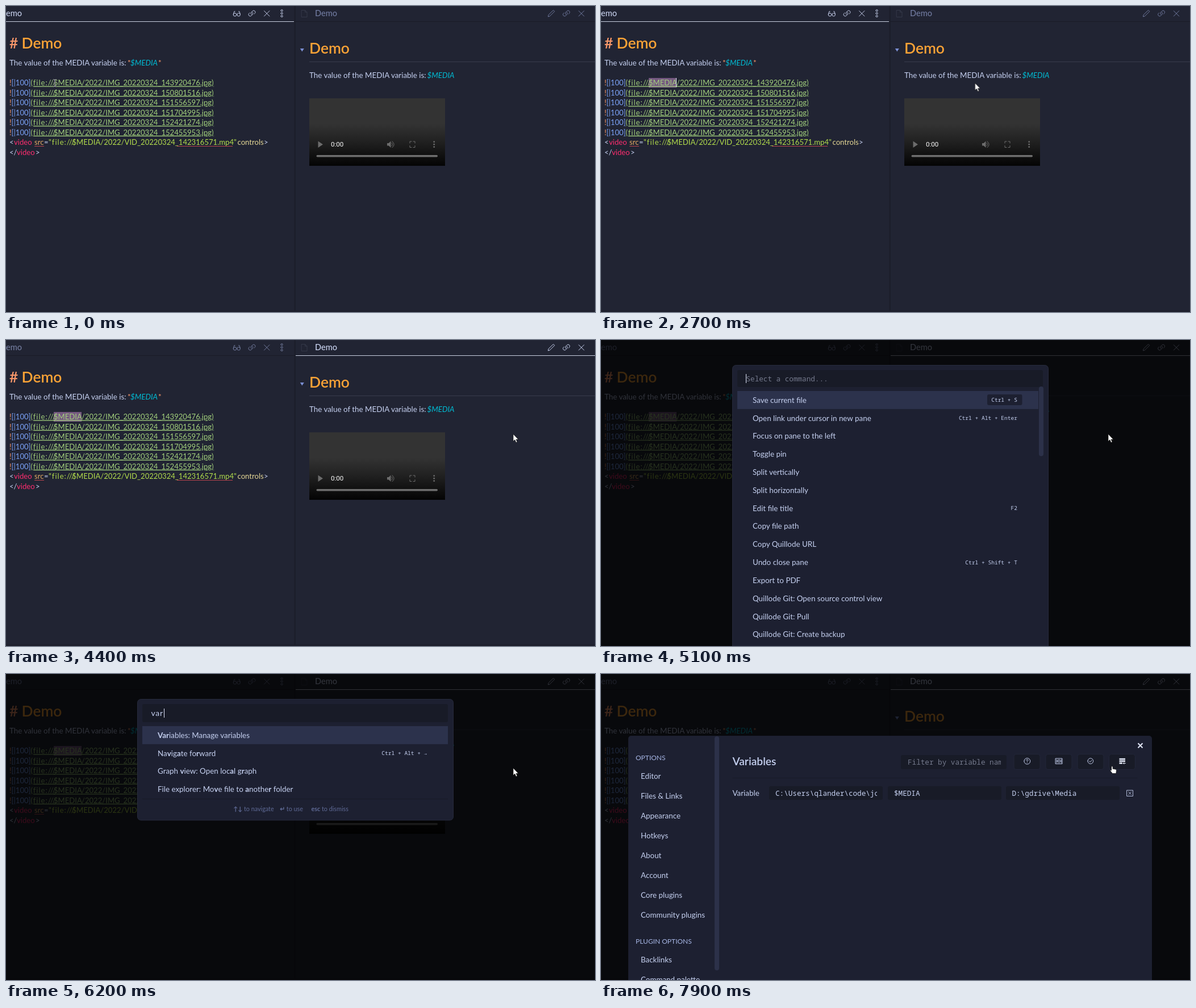
Recreate the animation shown at these times as an HTML page. Size 1037 by 540 pixels, loop 8000 ms.

```html
<!DOCTYPE html>
<html lang="en">
<head>
<meta charset="utf-8">
<title>Variables demo</title>
<style>
html, body { margin: 0; width: 100%; height: 100%; overflow: hidden; background: #212433; }
svg { display: block; }
#stage { width: 1037px; height: 540px; }
text { font: 13.4px Lato, "Open Sans", sans-serif; fill: #c5d0f0; white-space: pre; }
.code { font-size: 13.1px; }
.slashes { letter-spacing: 1px; }
.head { font-size: 14.6px; font-weight: 500; fill: currentColor; }
.h1 { font-size: 26.4px; font-weight: 600; fill: #fca336; }
.mono { font: 12.65px "Noto Sans Mono", "DejaVu Sans Mono", monospace; }
.key { font: 9.55px "Noto Sans Mono", "DejaVu Sans Mono", monospace; text-anchor: end; }
.dim { fill: #74798c; }
.small { font-size: 12px; fill: #a6b5e4; }
.foot { font-size: 10.8px; fill: #5f6a96; }
.typed { font-size: 14px; letter-spacing: .7px; }
.title { font-size: 19.2px; font-weight: 600; }
.time { font: 11.6px Roboto, sans-serif; fill: #fff; }
.salmon { fill: #f7976a; }
.blue { fill: #7aa2f7; }
.link { fill: #a2d07c; text-decoration: underline; text-decoration-skip-ink: none; }
.cyan { fill: #00bcd4; font-style: italic; }
.pink { fill: #ff2d6f; }
.gold { fill: #e2a862; }
.lime { fill: #b2dc4c; }
.sand { fill: #e5d795; }
.b { font-weight: 700; }
.icon { fill: none; stroke: currentColor; stroke-width: 1; stroke-linecap: round; stroke-linejoin: round; }

.a { animation: 8s -20ms step-end infinite; }
.left { animation-name: blur; }
.right { animation-name: focus; }
@keyframes blur { 0% { color: #c3cce8; } 55%, 100% { color: #737c9e; } }
@keyframes focus { 0% { color: #707a9f; } 55%, 100% { color: #c9d3f0; } }
.before { animation-name: before; }
.after { animation-name: after; }
@keyframes before { 0% { opacity: 1; } 55%, 100% { opacity: 0; } }
@keyframes after { 0% { opacity: 0; } 55%, 100% { opacity: 1; } }

.modal { animation-name: modal; }
.empty { animation-name: empty; }
.one { animation-name: one; }
.two { animation-name: two; }
.three { animation-name: three; }
.settings { animation-name: settings; }
.blink { animation-name: blink; }
@keyframes modal { 0% { opacity: 0; } 63.75%, 100% { opacity: 1; } }
@keyframes empty { 0% { opacity: 0; } 63.75% { opacity: 1; } 73.75%, 100% { opacity: 0; } }
@keyframes one { 0% { opacity: 0; } 73.75% { opacity: 1; } 75%, 100% { opacity: 0; } }
@keyframes two { 0% { opacity: 0; } 75% { opacity: 1; } 77.5%, 100% { opacity: 0; } }
@keyframes three { 0% { opacity: 0; } 77.5% { opacity: 1; } 83.75%, 100% { opacity: 0; } }
@keyframes settings { 0% { opacity: 0; } 83.75%, 100% { opacity: 1; } }
@keyframes blink { 0% { opacity: 1; } 71.25%, 100% { opacity: 0; } }

.sel { animation-name: drag; }
@keyframes drag {
  0% { width: 0; }
  5% { width: 0; animation-timing-function: steps(3); }
  8.75% { width: 213px; animation-timing-function: steps(6); }
  16.25% { width: 39px; }
  17.5%, 100% { width: 49px; }
}
.caret { animation-name: caret, pulse; }
@keyframes caret {
  0% { transform: translate(5px, 110px); }
  6.25% { transform: translate(155px, 127px); animation-timing-function: steps(2); }
  8.75% { transform: translate(297px, 127px); animation-timing-function: steps(6); }
  16.25% { transform: translate(123px, 127px); }
  17.5%, 100% { transform: translate(132px, 127px); }
}
@keyframes pulse {
  0% { opacity: 0; } 2.5% { opacity: 1; } 25% { opacity: 0; } 32.5% { opacity: 1; }
  40% { opacity: 0; } 47.5% { opacity: 1; } 55%, 100% { opacity: 0; }
}
.pointer { animation-name: move; }
@keyframes move {
  0% { transform: translate(86px, 136px); }
  5% { transform: translate(86px, 136px); animation-timing-function: steps(3); }
  8.75% { transform: translate(297px, 135.5px); animation-timing-function: steps(6); }
  16.25% { transform: translate(128px, 135.5px); }
  17.5% { transform: translate(132px, 135.5px); }
  21.25% { transform: translate(132px, 135.5px); animation-timing-function: steps(4); }
  26.25% { transform: translate(640px, 222px); }
  27.5% { transform: translate(744px, 232px); animation-timing-function: steps(2); }
  30% { transform: translate(650px, 125px); }
  31.25% { transform: translate(650px, 125px); animation-timing-function: steps(2); }
  33.75% { transform: translate(658.5px, 136px); animation-timing-function: steps(4); }
  38.75% { transform: translate(799px, 178px); animation-timing-function: steps(2); }
  41.25% { transform: translate(770px, 150px); }
  43.75% { transform: translate(770px, 150px); animation-timing-function: steps(3); }
  47.5% { transform: translate(943px, 63px); animation-timing-function: steps(3); }
  51.25% { transform: translate(893px, 166px); }
  96.25% { transform: translate(893px, 166px); animation-timing-function: steps(2); }
  98.75%, 100% { transform: translate(900px, 163px); }
}
.beam { animation-name: beam; }
.arrow { animation-name: arrow; }
.hand { animation-name: hand; }
@keyframes beam { 0% { opacity: 1; } 25%, 100% { opacity: 0; } }
@keyframes arrow { 0% { opacity: 0; } 25% { opacity: 1; } 97.5%, 100% { opacity: 0; } }
@keyframes hand { 0% { opacity: 0; } 97.5%, 100% { opacity: 1; } }
</style>
</head>
<body>
<svg id="stage" viewBox="0 0 1037 540"></svg>
<script>
const text = (x, y, s, c = '') => `<text x="${x}" y="${y}" class="${c}">${s}</text>`;
const rect = (x, y, w, h, fill, r = 0, more = '') =>
  `<rect x="${x}" y="${y}" width="${w}" height="${h}" fill="${fill}" rx="${r}" ${more}/>`;
const icon = (d, color = 'currentColor') => `<path class="icon" d="${d}" style="stroke:${color}"/>`;
const anim = (name, ...parts) => `<g class="a ${name}">${parts.join('')}</g>`;
const clip = (x, y, w, h, s, c) =>
  `<svg x="${x}" y="${y}" width="${w}" height="${h}" overflow="hidden">${text(0, 17, s, c)}</svg>`;
// *x* marks the matched letters
const bold = s => s.replace(/\*(.+?)\*/g, '<tspan class="b">$1</tspan>');

const cross = (x, y, r) => `M${x - r} ${y - r}l${2 * r} ${2 * r}m0 ${-2 * r}l${-2 * r} ${2 * r}`;
const chain = (x, y) => `M${x - 1} ${y + 2}a3 3 0 0 1 0-4l2.5-2.5a2.9 2.9 0 0 1 4 4l-1.5 1.5` +
  `M${x + 1} ${y - 2}a3 3 0 0 1 0 4l-2.5 2.5a2.9 2.9 0 0 1-4-4l1.5-1.5`;
const ring = (x, y, r) => `M${x - r} ${y}a${r} ${r} 0 1 0 ${2 * r} 0a${r} ${r} 0 1 0 ${-2 * r} 0`;

function headers() {
  return rect(0, 27, 508, 1, '#191b27') + rect(510, 27, 527, 1, '#191b27') +
    anim('before', rect(0, 27, 507, 1, '#c9cfdf')) +
    anim('after', rect(510, 27, 527, 1, '#c9cfdf')) +
    anim('left',
      text(0, 17.5, 'emo', 'head'),
      icon(ring(403, 15.3, 2.8) + ring(409.6, 15.3, 2.8) + 'M400.3 14.5l1.6-5h1.2M412.4 14.5l-1.6-5h-1.2'),
      icon(chain(433, 13)), icon(cross(459.2, 13.3, 4.7)),
      icon(ring(485.6, 8, 1.6) + ring(485.6, 13, 1.6) + ring(485.6, 18, 1.6))) +
    icon('M520.5 7.5h6l3.5 3.5v8.5h-9.5zM526.5 7.5v3.5h3.5', '#343849') +
    anim('right',
      text(544, 17.5, 'Demo', 'head'),
      icon('M954.5 18.5l.7-3 8.5-8.2 2.2 2.2-8.4 8.3z'),
      icon(chain(986.6, 13)), icon(cross(1013, 13.3, 4.7)));
}

const sentence = 'The value of the MEDIA variable is:';

function editor() {
  let out = `<rect class="a sel" x="84" y="127" height="17" fill="#755980"/>` +
    text(6, 75, '#', 'h1 salmon') + text(27.5, 75, 'Demo', 'h1') +
    text(6, 105, sentence) +
    text(214, 105, '*', 'salmon') + text(219, 105, '$MEDIA', 'cyan') + text(268, 105, '*', 'salmon');
  ['143920476', '150801516', '151556597', '151704995', '152421274', '152455953'].forEach((id, i) => {
    const y = 140.3 + i * 17.5;
    out += text(6, y, '!', 'code salmon') + text(9.5, y, '[|100]', 'code blue') +
      text(43.5, y, '(file:///', 'code link slashes') + text(84, y, '$MEDIA', 'code link') +
      text(133, y, `/2022/IMG_20220324_${id}.jpg)`, 'code link');
  });
  const y = 245.3;
  return out + text(6, y, '&lt;', 'code') + text(14, y, 'video', 'code pink') +
    text(50, y, 'src', 'code gold') + text(67, y, '=', 'code') +
    text(75, y, '"file:///', 'code lime slashes') +
    text(116.5, y, '$MEDIA/2022/VID_20220324_142316571.mp4"', 'code lime') +
    text(407.5, y, 'controls', 'code sand') + text(454, y, '&gt;', 'code') +
    rect(50, 247, 17, 1, '#b8434f') + rect(301, 247, 98, 1, '#b8434f') +
    text(6, 262.8, '&lt;/', 'code') + text(19, 262.8, 'video', 'code pink') + text(52, 262.8, '&gt;', 'code') +
    `<rect class="a caret" width="1" height="16" fill="#e4e9f8"/>`;
}

function preview() {
  const gray = '#6c6c6c';
  return `<path d="M517.8 75h7l-3.5 5.5z" fill="#7b8fd4"/>` +
    text(534, 84, 'Demo', 'h1') + rect(534, 98, 503, 1, '#383c4d') +
    text(534, 126.6, sentence) + text(741.5, 126.6, '$MEDIA', 'cyan') +
    rect(534, 163, 239, 119, 'url(#shade)') +
    `<path d="M549.5 238.5v11.5l8.5-5.75z" fill="${gray}"/>` +
    text(572, 248.2, '0:00', 'time') +
    `<path d="M671 242v4.5h2.8l3.7 3.5v-11.5l-3.7 3.5z" fill="${gray}"/>` +
    icon('M679.5 241.5q2 2.7 0 5.5M680 238.8q6.5 5.5 0 11', gray) +
    icon('M711 242v-3h3M717 239h3v3M720 246.5v3h-3M714 249.5h-3v-3', gray) +
    [239.7, 244.2, 248.7].map(y => `<circle cx="753.7" cy="${y}" r="1.4" fill="${gray}"/>`).join('') +
    rect(546.5, 263, 213.5, 3.6, '#6f6f6f', 1.8);
}

const MODAL = '#1d2031', FIELD = '#181b27', HIGHLIGHT = '#2c324c', THUMB = '#2c3149';

// rows: [label, hotkey]; bottom is the modal's lower edge
function palette(query, rows, bottom) {
  const scroll = bottom > 540, top = query ? 92 : 90, right = scroll ? 770 : 778;
  const edge = scroll ? 733 : 741.5;
  let out = rect(231.5, 44.5, 556, bottom - 44.5, MODAL, 6, 'stroke="#262a3c"') +
    rect(240, 53, 538, top - 60, FIELD, 3) +
    rect(240, top, right - 240, 31.8, HIGHLIGHT);
  out += query
    ? text(255.5, 74, query, 'typed') + rect([263, 271, 278][query.length - 1], 61, 1, 16, '#dfe5f8')
    : text(255.5, 73, 'Select a command...', 'mono dim') +
      `<rect class="a blink" x="255" y="60" width="1" height="16" fill="#dfe5f8"/>`;
  rows.forEach(([label, key], i) => {
    const y = top + 20.8 + i * 31.81;
    out += text(267, y, bold(label));
    if (key && !i) out += rect(680, y - 14.8, 61.5, 19, MODAL, 3);
    if (key) out += text(edge, y - 1.5, key, 'key');
  });
  if (scroll) return out + rect(771, top - 8, 8, query ? 250 : 123, THUMB, 4);
  const f = bottom - 16;
  return out + rect(240, bottom - 38, 538, 1, '#171a26') +
    text(400, f, '<tspan class="b">↑↓</tspan> to navigate', 'foot') +
    text(482, f, '<tspan class="b">↵</tspan> to use', 'foot') +
    text(537.5, f, '<tspan class="b">esc</tspan> to dismiss', 'foot');
}

const save = 'Ctrl + S', enter = 'Ctrl + Alt + Enter';
const commands = [
  ['Save current file', save], ['Open link under cursor in new pane', enter],
  ['Focus on pane to the left'], ['Toggle pin'], ['Split vertically'], ['Split horizontally'],
  ['Edit file title', 'F2'], ['Copy file path'], ['Copy Quillode URL'],
  ['Undo close pane', 'Ctrl + Shift + T'], ['Export to PDF'],
  ['Quillode Git: Open source control view'], ['Quillode Git: Pull'], ['Quillode Git: Create backup']
];
const forV = [
  ['*V*ariables: Manage variables'], ['Split *v*ertically'], ['Graph *v*iew: Open graph view'],
  ['Graph *v*iew: Open local graph'], ['Open another *v*ault'], ['Sa*v*e current file', save],
  ['Na*v*igate back', 'Ctrl + Alt + ←'], ['Na*v*igate forward', 'Ctrl + Alt + →'],
  ['Quillode Git: Open source control *v*iew'], ['Toggle pre*v*iew', 'Ctrl + E'],
  ['File explorer: Mo*v*e file to another folder'], ['File explorer: Re*v*eal file in navigation'],
  ['Mo*v*e line up'], ['Mo*v*e line down']
];
const forVa = [
  ['*Va*riables: Manage variables'], ['Open another *va*ult'], ['Na*v*ig*a*te back', 'Ctrl + Alt + ←'],
  ['Na*v*ig*a*te forward', 'Ctrl + Alt + →'], ['Split *v*ertic*a*lly'],
  ['Graph *v*iew: Open gr*a*ph view'], ['Graph *v*iew: Open loc*a*l graph'],
  ['Graph *v*iew: St*a*rt timelapse'], ['File explorer: Mo*v*e file to *a*nother folder'],
  ['File explorer: Re*v*eal file in n*a*vigation'], ['Remo*v*e he*a*ding']
];
const forVar = [
  ['*Var*iables: Manage variables'], ['Na*v*ig*a*te fo*r*ward', 'Ctrl + Alt + →'],
  ['Graph *v*iew: Open loc*a*l g*r*aph'], ['File explorer: Mo*v*e file to *a*nothe*r* folder']
];

function settings() {
  let out = rect(48, 109, 922, 440, MODAL, 5) + rect(200, 110, 8, 413, THUMB, 4) +
    text(61, 152, 'OPTIONS', 'small') + text(61, 476.4, 'PLUGIN OPTIONS', 'small');
  ['Editor', 'Files &amp; Links', 'Appearance', 'Hotkeys', 'About', 'Account', 'Core plugins', 'Community plugins']
    .forEach((s, i) => out += text(70, 184.8 + 35 * i, s));
  out += text(70, 509.2, 'Backlinks') + text(70, 544.2, 'Command palette') +
    text(231.5, 161, 'Variables', 'title') +
    `<path d="${cross(949.5, 126.3, 4)}" stroke="#e3e8f8" stroke-width="2" fill="none"/>` +
    rect(528, 143, 186, 25, FIELD, 3) + clip(540, 143, 164, 25, 'Filter by variable names', 'mono dim');
  [727, 783, 839, 894.5].forEach(x => out += rect(x, 141.5, 46, 27, FIELD, 4, 'stroke="#222639"'));
  const c = '#c3cdec', light = '#e3e8f8';
  out += icon(ring(750.3, 153.8, 5.4) + 'M748.7 152.5q0-1.8 1.6-1.8t1.6 1.5q0 1-1.6 2v.6M750.3 156.8v.1', c) +
    icon('M800.5 149h11.5v9.5h-11.5z' + ring(806.2, 153.7, 2.6) + ring(806.2, 153.7, .6) +
      'M802.2 151v5.5M810.3 151v5.5', c) +
    icon(ring(861.8, 153.6, 4.9) + 'M859.6 153.7l1.7 1.7 2.9-3.2', c) +
    rect(912.5, 148.8, 10.5, 2.6, light) + rect(912.5, 152.4, 10.5, 2.6, light) +
    rect(912.5, 156, 5.5, 2.6, light) + icon('M919.5 157.5h4M921 156l-1.7 1.5 1.7 1.5', light) +
    rect(231.5, 183, 713, 1, '#181b28') + text(231.5, 215, 'Variable');
  [296, 505, 713].forEach(x => out += rect(x, 198, 200, 24, FIELD, 3));
  return out + clip(307, 198, 179, 24, 'C:\\Users\\qlander\\code\\jo', 'mono') +
    text(516, 215, '$MEDIA', 'mono') + text(723.5, 215, 'D:\\gdrive\\Media', 'mono') +
    icon('M926 205.2h10.5v10.3h-10.5z' + cross(931.25, 210.35, 2.4), '#b4bedd');
}

function pointer() {
  const beam = 'M-2.5-6.5q2.5 0 2.5 1.5v10q0 1.5-2.5 1.5M2.5-6.5q-2.5 0-2.5 1.5M0 5q0 1.5 2.5 1.5';
  const solid = d => `<path d="${d}" fill="#fff" stroke="#111" stroke-width=".7"/>`;
  return anim('pointer',
    anim('beam', `<path d="${beam}" fill="none" stroke="#14161e" stroke-width="2.2"/>`,
      `<path d="${beam}" fill="none" stroke="#d5d8de"/>`),
    anim('arrow', solid('M0 0v12.8l2.9-2.7 2.1 4.9 2.1-.9-2-4.7h3.9z')),
    anim('hand', solid('M-1.3 1q0-1.2 1.2-1.2t1.2 1.2v3.3l5 .9q1.5 .3 1.4 1.8l-.7 5.5h-6.3l-3.8-4.7q-.3-1.3 1-1.2l1 .6z')));
}

document.getElementById('stage').innerHTML =
  `<defs><linearGradient id="shade" x1="0" y1="0" x2="0" y2="1">
    <stop offset=".38" stop-color="#333"/><stop offset=".65" stop-color="#202020"/><stop offset="1" stop-color="#040404"/>
  </linearGradient></defs>` +
  rect(0, 0, 1037, 540, '#212433') + rect(507.5, 0, 2.5, 540, '#1c1e2b') + rect(0, 537.5, 1037, 2.5, '#1c1e2b') +
  headers() + editor() + preview() +
  anim('modal', rect(0, 0, 1037, 540, 'rgba(0,0,0,.76)')) +
  anim('empty', palette('', commands, 560)) +
  anim('one', palette('v', forV, 560)) +
  anim('two', palette('va', forVa, 480.5)) +
  anim('three', palette('var', forVar, 258)) +
  anim('settings', settings()) +
  pointer();
</script>
</body>
</html>
```
